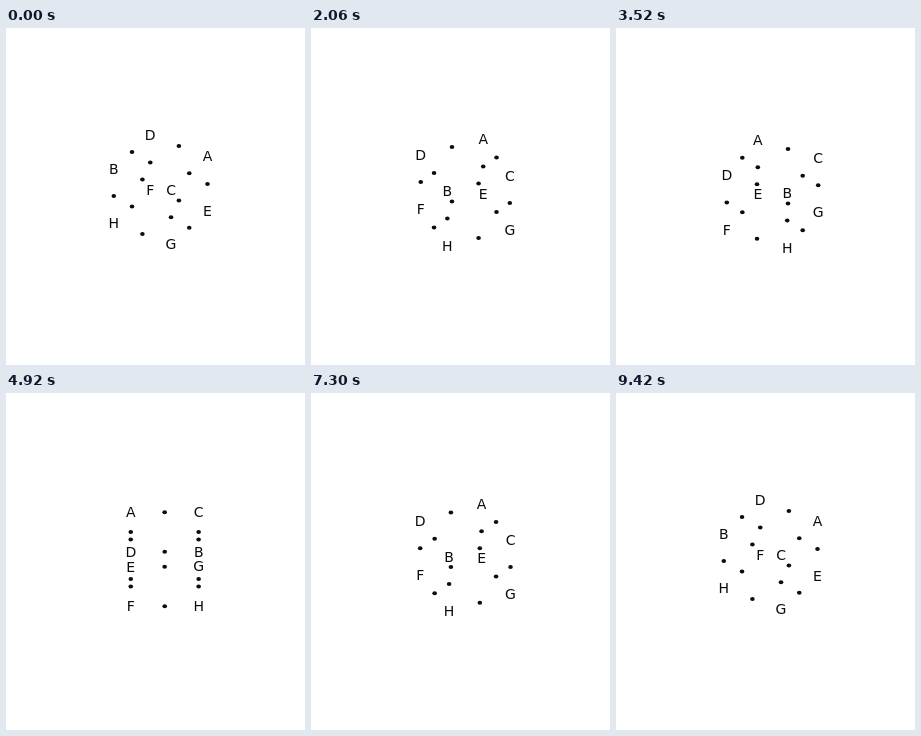
An HTML page with a canvas that plays this animation: 299x337 px, repeating every 9.46 s.

```html
<!DOCTYPE html>
<html lang="en">
<head>
<meta charset="utf-8">
<title>Rotating lettered cube</title>
<style>
html, body { margin: 0; width: 100%; height: 100%; overflow: hidden; background: #fff; }
canvas { display: block; }
</style>
</head>
<body>
<canvas id="stage" width="299" height="337"></canvas>
<script>
const ctx = document.getElementById('stage').getContext('2d');
const LOOP = 9460, STEP = 20, TURN = 235;
const START = 12.5, RATE = 0.5447; // degrees, degrees per step
const RX = 48, RY = 28, HEIGHT = 54.5;
const TOP = 'ADBC', BOTTOM = 'EFHG';
const rad = deg => deg * Math.PI / 180;

// Swings one way for TURN steps, then back.
function angleAt(t) {
  const i = Math.max(0, Math.min(2 * TURN, Math.floor(t / STEP) - 1));
  return START + RATE * (TURN - Math.abs(TURN - i));
}

function corners(angle) {
  // The cube is slightly off the axis it turns around.
  const off = rad(angle + 135);
  const cx = 158.7 + 4.8 * Math.cos(off);
  const cy = 136.5 - 2.8 * Math.sin(off);
  return [0, 1, 2, 3].map(k => {
    const a = rad(angle + 90 * k);
    return { x: cx + RX * Math.cos(a), y: cy - RY * Math.sin(a) };
  });
}

function dot(p, q) {
  ctx.beginPath();
  ctx.ellipse((p.x + q.x) / 2, (p.y + q.y) / 2 - 0.3, 2.3, 2, 0, 0, 2 * Math.PI);
  ctx.fill();
}

function label(text, p) {
  ctx.fillText(text, p.x, p.y + 4.5);
}

function draw(t) {
  ctx.fillStyle = '#fff';
  ctx.fillRect(0, 0, 299, 337);
  ctx.fillStyle = '#0c0c0c';
  ctx.font = '14px "DejaVu Sans", sans-serif';
  ctx.textAlign = 'center';

  const top = corners(angleAt(t));
  const bottom = top.map(p => ({ x: p.x, y: p.y + HEIGHT }));
  for (let k = 0; k < 4; k++) {
    const next = (k + 1) % 4;
    dot(top[k], top[next]);
    dot(bottom[k], bottom[next]);
    dot(top[k], bottom[k]);
    label(TOP[k], top[k]);
    label(BOTTOM[k], bottom[k]);
  }
}

const begin = performance.now();
function tick() {
  draw((performance.now() - begin) % LOOP);
  requestAnimationFrame(tick);
}
tick();
</script>
</body>
</html>
```
